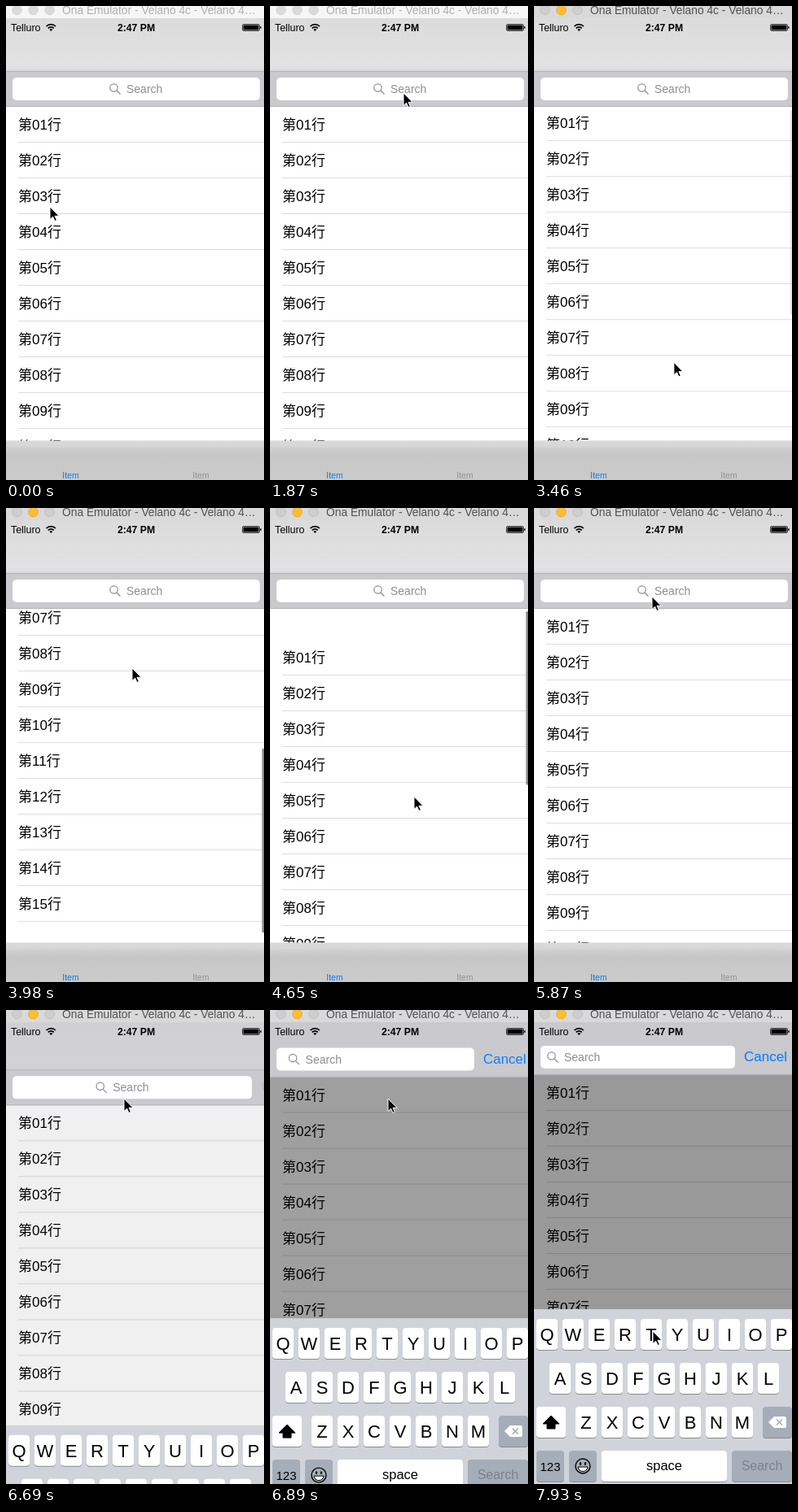
An HTML page for the animation above (7990 ms loop, 317x583 px).

```html
<!DOCTYPE html>
<html lang="en">
<head>
<meta charset="utf-8">
<title>Search bar demo</title>
<style>
  html, body { margin: 0; width: 100%; height: 100%; overflow: hidden; background: #fff; }
  svg { display: block; width: 317px; height: 583px; }
  text { font-family: "Liberation Sans", "Noto Sans CJK SC", "Noto Sans CJK JP", "Noto Sans CJK", sans-serif; }
  .mid { text-anchor: middle; }
</style>
</head>
<body>
<svg id="stage" viewBox="0 0 317 583" xmlns="http://www.w3.org/2000/svg"></svg>
<script>
const LOOP = 7990;
const ROW = 44, ROWS = 15, LIST_TOP = 124, LIST_BOTTOM = 535;
const BAR = "#c9c9ce", BLUE = "#007aff";

const rect = (x, y, w, h, fill, extra = "") =>
  `<rect x="${x}" y="${y}" width="${w}" height="${h}" fill="${fill}" ${extra}/>`;
const label = (x, y, size, str, fill = "#000", extra = "") =>
  `<text x="${x}" y="${y}" font-size="${size}" fill="${fill}" ${extra}>${str}</text>`;
const gradient = (id, stops) =>
  `<linearGradient id="${id}" x1="0" y1="0" x2="0" y2="1">${stops.map(([at, color]) =>
    `<stop offset="${at}" stop-color="${color}"/>`).join("")}</linearGradient>`;

function rows() {
  let out = "";
  for (let i = 0; i < ROWS; i++) {
    const y = LIST_TOP + i * ROW;
    out += label(15, y + 28, 17, `第${String(i + 1).padStart(2, "0")}行`);
    out += rect(15, y + 43, 302, 1, "#dddde0");
  }
  return out;
}

function key(x, y, w, cap = "", { size = 22, fill = "#fff", color = "#000", drop = 27 } = {}) {
  return rect(x, y + 1, w, 38, "#898c91", 'rx="4"') + rect(x, y, w, 38, fill, 'rx="4"') +
    label(x + w / 2, y + drop, size, cap, color, 'class="mid"');
}

function keyboard() {
  const gray = "#a5adb8";
  const letters = (chars, x, y) => [...chars].map((c, i) => key(x + i * 32, y, 26, c)).join("");
  return rect(0, 368, 317, 216, "#d0d4da") +
    letters("QWERTYUIOP", 3, 380) + letters("ASDFGHJKL", 19, 434) + letters("ZXCVBNM", 51, 488) +
    key(3, 488, 36) + key(281, 488, 36, "", { fill: gray }) +
    key(3, 542, 34, "123", { size: 15, fill: gray, drop: 25 }) +
    key(43, 542, 34, "", { fill: gray }) +
    key(83, 542, 154, "space", { size: 16.5, drop: 24 }) +
    key(243, 542, 74, "Search", { size: 16, fill: gray, color: "#7b838d", drop: 24 }) +
    `<path d="M21 499L31 509H26V515H16V509H11Z" stroke="#000" stroke-linejoin="round"/>
     <path d="M288 507L295 500H308Q310 500 310 502V512Q310 514 308 514H295Z" fill="#fff"/>
     <path d="M298 503.500L305 510.500M305 503.500L298 510.500" stroke="${gray}" stroke-width="1.500"/>
     <circle cx="60" cy="561" r="9" fill="none" stroke="#000" stroke-width="1.400"/>
     <ellipse cx="57" cy="558" rx="1.200" ry="1.900"/><ellipse cx="63" cy="558" rx="1.200" ry="1.900"/>
     <path d="M54 562H66Q65 567.500 60 567.500T54 562Z" fill="#fff" stroke="#000"/>`;
}

const statusBar =
  label(6, 31, 12.4, "Telluro") +
  label(160, 31, 12.2, "2:47 PM", "#000", 'class="mid" font-weight="bold"') +
  `<g fill="none" stroke="#000" stroke-width="1.700">
     <path d="M49.500 25A8 8 0 0 1 61 25M51.700 27.300A5 5 0 0 1 58.800 27.300"/>
   </g>
   <path d="M53.200 28.800Q55.250 27.200 57.300 28.800L55.250 31Z"/>` +
  rect(290.5, 22.5, 21, 8, "none", 'rx="1.500" stroke="#000" stroke-width=".7"') +
  rect(291.5, 23.5, 19, 6, "#000", 'rx=".6"') +
  rect(312.3, 25, 1.4, 3, "#000", 'rx=".7"');

const stage = document.getElementById("stage");
stage.innerHTML = `
  <defs>
    ${gradient("navFill", [[0, "#dbdbdb"], [0.9, "#e2e2e2"], [1, "#dadada"]])}
    ${gradient("tabFill", [[0, "#dadada"], [0.16, "#d6d6d6"], [0.18, "#cfcfcf"], [0.38, "#c7c7c7"], [1, "#cbcbcb"]])}
    <clipPath id="listClip"><rect id="listWindow" width="317"/></clipPath>
  </defs>
  ${rect(0, 0, 317, 583, "#fff")}
  <g clip-path="url(#listClip)"><g id="list">${rows()}</g></g>
  ${rect(314.5, 127, 2.5, 250, "#8c8c8c", 'id="indicator" rx="1.200"')}
  ${rect(0, 534.5, 317, 49, "url(#tabFill)")}
  ${label(79.5, 580.5, 10.5, "Item", BLUE, 'class="mid"')}
  ${label(239.5, 580.5, 10.5, "Item", "#929292", 'class="mid"')}
  ${rect(0, 0, 317, 583, "#000", 'id="dim"')}
  <g id="nav">${rect(0, 15, 317, 65, "url(#navFill)")}</g>
  ${rect(0, 15, 317, 66, BAR, 'id="navTint"')}
  <g id="searchBar">
    ${rect(0, 80, 317, 44, BAR)}
    ${rect(0, 80, 317, 1, "#b3b3b5", 'id="topLine"')}
    ${rect(0, 123, 317, 1, "#b3b3b7")}
    ${rect(8, 88, 304, 28, "#fff", 'id="field" rx="5"')}
    <g id="prompt">
      <g fill="none" stroke="#8e8e93" stroke-width="1.200">
        <circle cx="132.500" cy="100.500" r="4.700"/><path d="M136 104L140.500 108.500"/>
      </g>
      ${label(148, 107, 14, "Search", "#8e8e93")}
    </g>
    ${rect(36, 92, 2, 20, "#3f6fe6", 'id="caret"')}
    ${label(0, 107, 17, "Cancel", BLUE, 'id="cancel"')}
  </g>
  <g id="titleBar">
    ${rect(0, 0, 317, 15, "#f6f6f6", 'id="titleFill"')}
    <g stroke-width=".8">${[13.5, 33.5, 53.5].map(x => `<circle class="light" cx="${x}" cy="5" r="5.800"/>`).join("")}</g>
    ${label(69, 10, 13.8, "Ona Emulator - Velano 4c - Velano 4…", "#b0b0b0", 'id="titleText"')}
  </g>
  ${statusBar}
  <g id="keyboard">${keyboard()}</g>
  <path id="cursor" d="M0 0V15.500L3.600 12.200L6 17.500L8.400 16.400L6 11.300H11Z"
    stroke="#fff" stroke-width="1" stroke-linejoin="round"/>`;

const el = {};
stage.querySelectorAll("[id]").forEach(node => el[node.id] = node);
const lights = stage.querySelectorAll(".light");
const set = (node, attrs) => { for (const name in attrs) node.setAttribute(name, attrs[name]); };
const shift = (node, x, y) => set(node, { transform: `translate(${x} ${y})` });
const clamp = v => Math.min(1, Math.max(0, v));
const ramp = (t, from, to) => clamp((t - from) / (to - from));
const smooth = u => u * u * (3 - 2 * u);

// Monotone cubic through [time, value, ...] keys
function track(keys, t, col = 1) {
  const last = keys.length - 1;
  if (t <= keys[0][0]) return keys[0][col];
  if (t >= keys[last][0]) return keys[last][col];
  const rate = i => (keys[i + 1][col] - keys[i][col]) / (keys[i + 1][0] - keys[i][0]);
  const slope = i => {
    if (i === 0 || i === last) return 0;
    const a = rate(i - 1), b = rate(i);
    return a * b <= 0 ? 0 : 2 * a * b / (a + b);
  };
  const i = keys.findIndex(k => k[0] > t) - 1;
  const span = keys[i + 1][0] - keys[i][0], u = (t - keys[i][0]) / span;
  const a = keys[i][col], b = keys[i + 1][col];
  return a + (b - a) * smooth(u) +
    span * u * (1 - u) * (slope(i) * (1 - u) - slope(i + 1) * u);
}

const cursorKeys = [
  [50, 54, 247], [250, 75, 238], [560, 142, 150], [820, 148, 186], [1000, 149, 196],
  [1170, 150, 187], [1720, 150, 186], [1870, 164, 107], [2580, 164, 106], [3080, 164, 106],
  [3380, 172, 440], [3440, 172, 440], [3860, 156, 201], [3980, 155, 197], [4050, 156, 201],
  [4400, 176, 348], [4650, 177, 355], [4720, 176, 350], [5120, 133, 148], [5400, 142, 109],
  [5800, 143, 107], [5870, 145, 109], [7170, 145, 109], [7430, 139, 500], [7540, 138, 527],
  [7800, 146, 410], [7930, 146, 395]
];
const scrollKeys = [
  [3440, 0], [3850, 262], [3980, 275], [4060, 258], [4400, 40], [4580, -32],
  [4650, -38], [4800, -28], [5000, -7], [5120, -2], [5250, 0]
];

function drawIndicator(t, offset) {
  const view = 410, total = ROW * ROWS, length = 405;
  const top = Math.max(0, offset) / total * length;
  const over = Math.max(0, -offset, offset - (total - view));
  const height = length * view / total - over;
  set(el.indicator, {
    y: 127 + Math.min(top, length - height),
    height,
    opacity: ramp(t, 3440, 3540) * (1 - ramp(t, 5270, 5510))
  });
}

function drawTitle(active) {
  set(el.titleFill, { fill: active ? "#d9d9d9" : "#f6f6f6" });
  set(el.titleText, { fill: active ? "#505050" : "#b0b0b0" });
  lights.forEach((light, i) => {
    const lit = active && i === 1;
    set(light, {
      fill: lit ? "#ffbd2e" : active ? "#cecece" : "#dadada",
      stroke: lit ? "#dfa023" : active ? "#b9b9b9" : "#d0d0d0"
    });
  });
}

function draw(t) {
  const offset = track(scrollKeys, t);
  const p = smooth(ramp(t, 6610, 6940));
  const rise = ROW * p;
  const keys = 1 - (1 - ramp(t, 6640, 7040)) ** 3;

  drawTitle(t >= 3430);
  shift(el.list, 0, -offset - rise);
  set(el.listWindow, { y: LIST_TOP - rise, height: LIST_BOTTOM - LIST_TOP + rise });
  drawIndicator(t, offset);
  set(el.dim, { y: LIST_TOP - rise, opacity: 0.4 * p });

  shift(el.nav, 0, -rise);
  set(el.navTint, { height: 66 - rise, opacity: clamp(p * 4) });
  shift(el.searchBar, 0, -rise);
  set(el.topLine, { opacity: 1 - p });
  set(el.field, { width: 304 - 65 * p });
  shift(el.prompt, -111 * p, 0);
  set(el.cancel, { x: 324 - 66 * p, opacity: p });
  set(el.caret, { opacity: ramp(t, 6940, 7000) * (1 - ramp(t, 7520, 7680)) });

  shift(el.keyboard, 0, 215 * (1 - keys));
  shift(el.cursor, track(cursorKeys, t, 1), track(cursorKeys, t, 2));
}

const start = performance.now();
function tick() {
  draw((performance.now() - start) % LOOP);
  requestAnimationFrame(tick);
}
tick();
</script>
</body>
</html>
```
